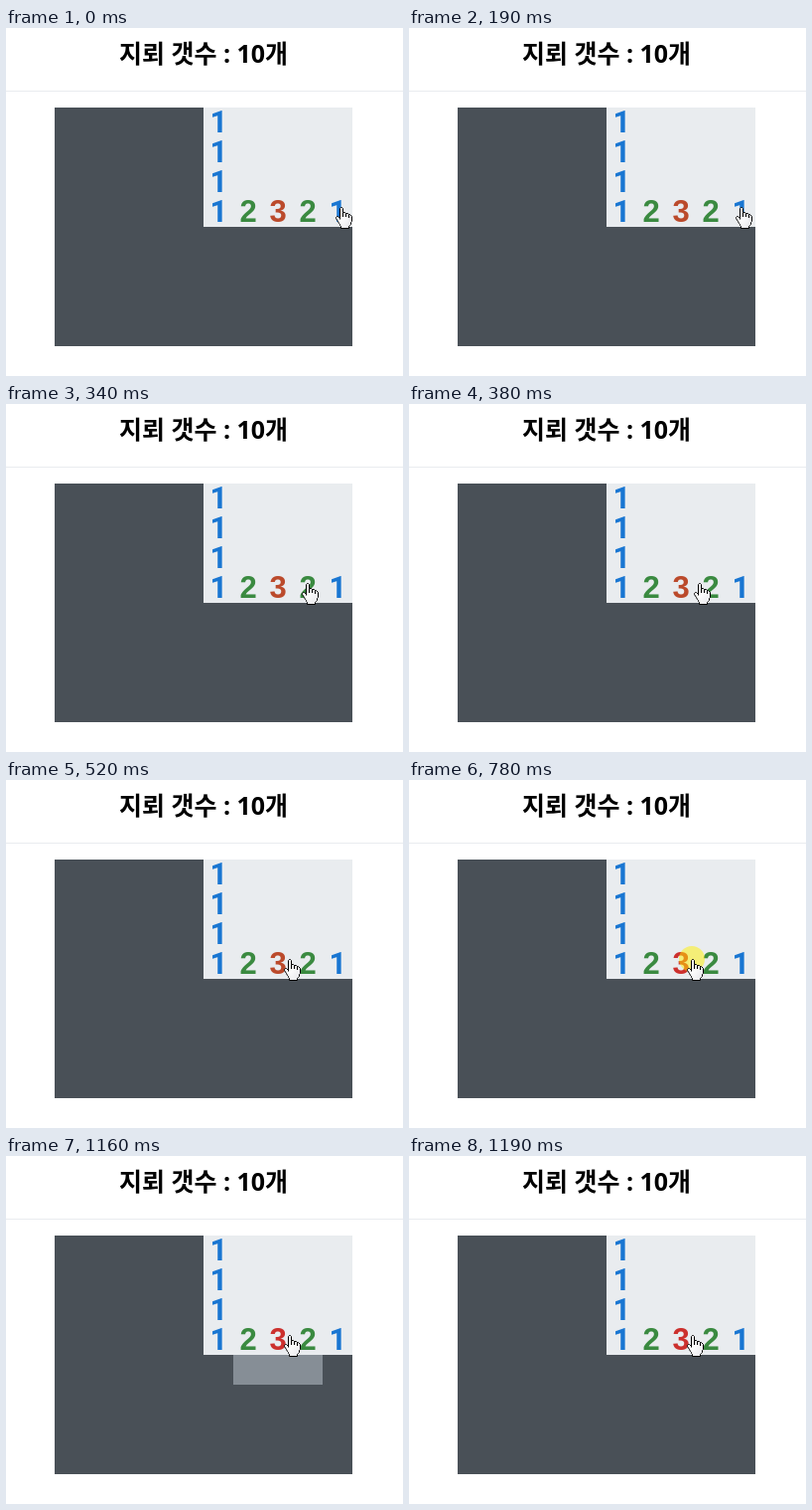
These frames come from a looping animation (400x350 px, 1290 ms). An HTML page:

```html
<!DOCTYPE html>
<html lang="ko">
<head>
<meta charset="utf-8">
<title>지뢰 찾기</title>
<style>
  html, body { margin: 0; width: 100%; height: 100%; overflow: hidden; background: #fff; }
  svg { display: block; width: 400px; height: 350px; }
  .title { font: 700 25px "Noto Sans", "Noto Sans CJK KR", "Noto Sans CJK", sans-serif; text-anchor: middle; }
  .digits { font: 700 31px "Liberation Sans", Arial, sans-serif; text-anchor: middle; }
  .one { font-family: Roboto, sans-serif; fill: #1976d2; }
  .two { fill: #3a8a40; }

  .three, .press, .hint, .hand { animation: 1290ms step-end infinite; }
  .three { animation-name: three; }
  .press { animation-name: press; }
  .hint { animation-name: hint; }
  .hand { animation-name: hand; }

  @keyframes three {
    0% { fill: #bb4a2b; }
    60.46%, 100% { fill: #cc302d; }
  }
  @keyframes press {
    0% { visibility: hidden; }
    60.46% { visibility: visible; }
    89.92%, 100% { visibility: hidden; }
  }
  @keyframes hint {
    0% { visibility: hidden; }
    65.89% { visibility: visible; }
    92.24%, 100% { visibility: hidden; }
  }
  @keyframes hand {
    0% { transform: translate(332px, 180px); }
    12.4% { transform: translate(331px, 180px); }
    14.72% { transform: translate(329px, 180px); }
    17.05% { transform: translate(326px, 180px); }
    19.37% { transform: translate(322px, 180px); }
    21.7% { transform: translate(317px, 180px); }
    24.03% { transform: translate(308px, 180px); }
    26.35% { transform: translate(298px, 180px); }
    29.45% { transform: translate(287px, 180px); }
    31.78% { transform: translate(284px, 180px); }
    34.1% { transform: translate(282px, 180px); }
    36.43% { transform: translate(281px, 180px); }
    40.31%, 100% { transform: translate(280px, 180px); }
  }
</style>
</head>
<body>
<svg viewBox="0 0 400 350">
  <linearGradient id="shade" x2="1" y2="1">
    <stop offset=".4" stop-color="#fff"/>
    <stop offset="1" stop-color="#e4e4e8"/>
  </linearGradient>

  <text class="title" x="199" y="35">지뢰 갯수 : 10개</text>
  <rect y="63" width="400" height="1" fill="#e9ecef"/>

  <rect x="49" y="80" width="300" height="240" fill="#495057"/>
  <rect x="199" y="80" width="150" height="120" fill="#e9ecef"/>
  <rect class="hint" x="229" y="200" width="90" height="30" fill="#868e96"/>

  <g class="digits">
    <text class="one" x="214.5" y="105">1</text>
    <text class="one" x="214.5" y="135">1</text>
    <text class="one" x="214.5" y="165">1</text>
    <text class="one" x="214.5" y="195">1</text>
    <text class="two" x="244" y="195">2</text>
    <text class="three" x="274" y="195">3</text>
    <text class="two" x="304" y="195">2</text>
    <text class="one" x="334.5" y="195">1</text>
  </g>

  <circle class="press" cx="285" cy="180" r="13" fill="#fff000" fill-opacity=".5"/>

  <path class="hand" fill="url(#shade)" stroke="#000" d="M4.5 12.5V1.5L5.5 .5H6.5L7.5 1.5V5.5H9.5L10.5 6.5H12.5L13.5 7.5H14.5L16.5 9.5V14.5L15.5 15.5V17.5L14.5 18.5L13.5 19.5V21.5H5.5V19.5L4.5 18.5V17.5L3.5 16.5L2.5 14.5L.5 11.5V10.5L1.5 9.5H2.5L4.5 11.5M7.5 5.5V10M10.5 6.5V10M13.5 7.5V11"/>
</svg>
</body>
</html>
```
